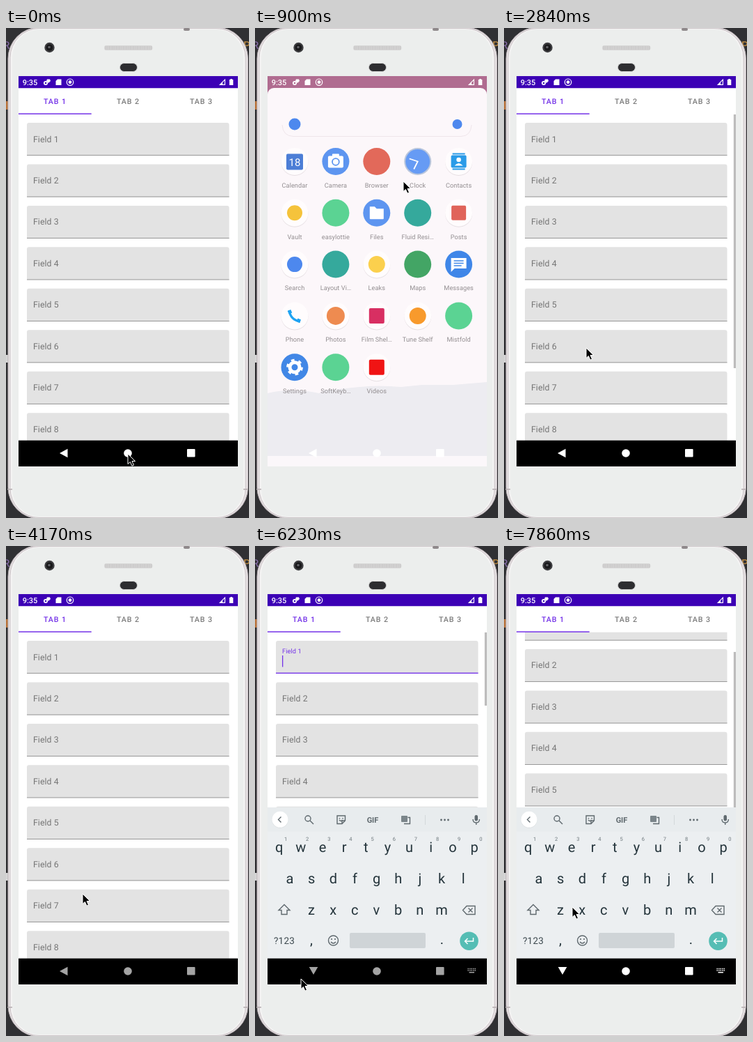
Write an HTML page that moves like this. It is 349 px wide and 703 px high and loops after 8000 ms.

```html
<!DOCTYPE html>
<html lang="en">
<head>
<meta charset="utf-8">
<title>Phone keyboard demo</title>
<style>
html, body { margin: 0; width: 100%; height: 100%; overflow: hidden; background: #303033; }
svg { display: block; width: 349px; height: 703px; font-family: Roboto, sans-serif; text-rendering: geometricPrecision; }
.mid { text-anchor: middle; }
.tab { font-size: 10.7px; font-weight: 500; letter-spacing: .95px; fill: #7b7b7b; }
.field { font-size: 12.25px; letter-spacing: .1px; fill: #757575; }
.app { font-size: 9.2px; letter-spacing: .05px; fill: #938e91; }
.key { font-size: 20px; fill: #24343b; }
.hint { font-size: 7.5px; fill: #6d777c; }
.line { fill: none; stroke: #5f696e; stroke-width: 1.4; }
</style>
</head>
<body>
<svg id="stage" viewBox="0 0 349 703"></svg>
<script>
const LOOP = 8000, STEPS = 54;
const PURPLE = '#7433e8', PITCH = 59.45;

const rect = (x, y, w, h, fill, rx = 0, more = '') =>
  `<rect x="${x}" y="${y}" width="${w}" height="${h}" rx="${rx}" fill="${fill}" ${more}/>`;
const circle = (x, y, r, fill, more = '') => `<circle cx="${x}" cy="${y}" r="${r}" fill="${fill}" ${more}/>`;
const path = (d, fill, more = '') => `<path d="${d}" fill="${fill}" ${more}/>`;
const stroke = (d, color, width) => path(d, 'none', `stroke="${color}" stroke-width="${width}"`);
const text = (x, y, s, cls, more = '') => `<text x="${x}" y="${y}" class="${cls}" ${more}>${s}</text>`;
const group = (id, body, more = '') => `<g id="${id}" ${more}>${body}</g>`;
const at = (x, y, body) => `<g transform="translate(${x} ${y})">${body}</g>`;

// Phone body and the desktop peeking out behind it
const phone = () =>
  rect(0, 0, 349, 703, '#303033') +
  text(-4, 30, 'R', '', 'font-size="15" fill="#8b6fae"') +
  text(341, 30, 'P', '', 'font-size="15" fill="#d59a45"') +
  rect(0, 105, 3, 12, '#b9743c') + rect(0, 469, 3, 11, '#d5d5d5') +
  rect(3, -1, 344.5, 705, '#e6e1e3', 45, 'stroke="#b9b1b5"') +
  rect(6, .5, 338, 702, '#f4f3f3', 42, 'stroke="#c3babe" stroke-width=".8"') +
  rect(9, 2, 332, 699, '#eceeed', 40) +
  rect(2, 661, 7, 1.5, '#b5adb0') + rect(341, 661, 7, 1.5, '#b5adb0') +
  rect(255, 0, 9, 4, '#8f898b', 2) +
  circle(62.5, 28, 7.2, '#3c3c3f') + circle(62.5, 28, 4.8, '#19191b') + circle(62, 27.5, 1.8, '#626266') +
  rect(141, 25, 69.5, 7, '#d6d5d5', 3) +
  path('M143 28.5H209', 'none', 'stroke="#c6c5c5" stroke-width="5" stroke-dasharray="1 1.5"') +
  rect(163.5, 50.5, 25, 12, '#2d2d30', 6, 'stroke="#d2d2d2"');

const field = i => {
  const y = 136 + i * PITCH;
  return `<g class="box">${path(`M30 ${y + 47}V${y + 3}q0 -3 3 -3H317.5q3 0 3 3V${y + 47}Z`, '#e3e3e3')}
    ${rect(30, y + 46.2, 290.5, .9, '#8e8e8e', 0, 'class="rule"')}
    ${text(39, y + 27.5, 'Field ' + (i + 1), 'field')}</g>`;
};

const form = () =>
  rect(18, 69, 315, 560, '#fff') +
  group('viewport',
    group('fields', [...Array(10).keys()].map(field).join('') + rect(39, 157, 1.3, 16.5, PURPLE, 0, 'id="caret"')) +
    rect(329.8, 124, 3.2, 364, '#bcbcbc', 0, 'id="thumb"'), 'clip-path="url(#list)"') +
  rect(18, 69, 315, 17.5, '#3c00b5') + rect(18, 86.5, 315, 37, '#fff') +
  [70.5, 175.5, 280.5].map((x, i) =>
    text(x, 109, 'TAB ' + (i + 1), 'tab mid', i ? '' : `style="fill:${PURPLE}"`)).join('') +
  rect(18, 122.4, 104.7, 1.5, PURPLE) +
  rect(18, 69, 315, 560, '#fff', 0, 'id="splash"');

// Launcher icons, drawn around 0,0
const disc = circle(0, 1, 19.5, '#e6dfe3') + circle(0, 0, 19.5, '#fffcfd');
const solid = fill => circle(0, 0, 19.5, fill);
const dot = (r, fill) => disc + circle(0, 0, r, fill);
const tile = (size, fill) => disc + rect(-size / 2, -size / 2, size, size, fill, 2);
const gear = circle(0, 0, 7, 'none', 'stroke="#fff" stroke-width="5"') +
  circle(0, 0, 10.2, 'none', 'stroke="#fff" stroke-width="3.4" stroke-dasharray="4.6 6.08"');
const GREEN = '#5bd393', TEAL = '#35a99c', BLUE = '#5d95f0', SKY = '#2a9be8';
const apps = [
  ['Calendar', disc + rect(-12, -11, 24, 23, '#4c7ed6', 2) +
    text(0, 6.5, '18', 'mid', 'font-size="15" fill="#fff"')],
  ['Camera', solid(BLUE) + rect(-11, -8, 22, 17, '#fff', 2) + rect(-5, -11, 10, 5, '#fff', 1) +
    circle(0, .5, 5.8, BLUE) + circle(0, .5, 4, '#fff')],
  ['Browser', solid('#e2695a')],
  ['Clock', solid('#b9c6dc') + circle(0, 0, 17.5, '#669bf4') + stroke('M-12 -4L0 0L-5.5 11', '#fff', 1.8)],
  ['Contacts', disc + rect(-11, -9, 22, 18, SKY, 2) + rect(-9, -12, 18, 2, SKY) +
    rect(-9, 10, 18, 2, SKY) + circle(0, -2.5, 3.3, '#fff') + path('M-6 6q6 -7 12 0z', '#fff')],
  ['Vault', dot(11, '#f5c33b')],
  ['easylottie', solid(GREEN)],
  ['Files', solid(BLUE) + path('M-10 -9h7l3 3h10v14q0 1 -1 1h-18q-1 0 -1 -1z', '#fff')],
  ['Fluid Resi…', solid(TEAL)],
  ['Posts', tile(21, '#e0645a')],
  ['Search', dot(11, '#4d88ee')],
  ['Layout Vi…', solid(TEAL)],
  ['Leaks', dot(12, '#fbd04d')],
  ['Maps', solid('#43a565')],
  ['Messages', solid('#3f86e8') + path('M-11 -9h22v15h-17l-5 5z', '#fff') +
    stroke('M-7 -5H7M-7 -1.5H7M-7 2H4', '#3f86e8', 1.5)],
  ['Phone', disc + stroke('M-8 -8q2 14 16 16', '#1fa3f2', 3.2) + stroke('M-8 -8l2 4.5M8 8l-4.5 -2', '#1fa3f2', 5)],
  ['Photos', dot(13, '#ee8b50')],
  ['Film Shel…', tile(22, '#d82f62')],
  ['Tune Shelf', dot(12, '#f89a2c')],
  ['Mistfold', solid(GREEN)],
  ['Settings', solid('#4187e6') + gear],
  ['SoftKeyb…', solid(GREEN)],
  ['Videos', tile(22, '#f01414')]
];
const appCell = ([name, art], i) => {
  const x = 57 + (i % 5) * 58.9, y = 164.5 + Math.floor(i / 5) * 73.8;
  const cell = at(x, y, art) + text(x, y + 37.3, name, 'app mid');
  return name.startsWith('Soft') ? group('launchSlot', cell) : cell;
};

const ridge = fill =>
  path('M18 524Q40 519 60 520T92 524L100 519Q125 518 150 515T210 515L240 512L285 512L333 508V629H18Z', fill);

const drawer = () =>
  rect(18, 59, 315, 650, '#fcf7fa', 9, 'id="panel"') +
  group('ridge', ridge('#edecf1')) +
  group('strip', rect(18, 587, 315, 38, '#fbf7fa')) +
  group('icons',
    stroke('M39 112q1 16 16 16.5H296q14 -.5 15 -16.5', '#eee4e9', .9) +
    circle(57, 111, 8.5, '#4d88ee') + circle(290.5, 111, 7, '#4d88ee') + apps.map(appCell).join(''));

const home = () =>
  rect(18, 69, 315, 560, '#b06c90') + ridge('#655b82') +
  [15, 14, 2, 1].map((a, i) => at(86 + i * 59, 510, apps[a][1])).join('') +
  rect(39, 548, 272, 34, '#fcf7fa', 17) + circle(57, 565, 8.5, '#4d88ee');

const keyboard = () => {
  const row = (letters, x, y) => [...letters].map((c, i) => text(x + i * 31.15, y, c, 'key mid')).join('');
  const line = d => path(d, 'none', 'class="line"');
  const grey = '#5f696e';
  return rect(18, 375, 315, 217, '#eceff1') + rect(18, 375, 315, 34.5, '#e8ecee') +
    circle(36, 393, 11.7, '#dce0e2') + circle(36, 392.3, 11.5, '#fff') + line('M37.5 388.5l-4 4l4 4') +
    circle(76, 391, 4, 'none', 'class="line"') + line('M79 394l5 5') +
    line('M118 387h11.5v7l-4.5 4.5h-7zM129.5 394h-4.5v4.5M121 393q2.5 3 4.5 0M121.5 390v1.5M126 390v1.5') +
    text(169, 396.5, 'GIF', 'mid', `font-size="11" font-weight="700" fill="${grey}"`) +
    rect(210, 387, 9, 9, '#7b858a', 1) + line('M214 398.5h8.5v-9h-3') +
    rect(244, 386, 1, 14, '#d3d8da') +
    [267.5, 272.5, 277.5].map(x => circle(x, 393, 1.4, grey)).join('') +
    rect(315.5, 386, 4.5, 8.5, grey, 2.2) + line('M313 392q0 5 4.7 5t4.7 -5M317.7 397v3') +
    row('qwertyuiop', 34.7, 439) + row('asdfghjkl', 50, 484) + row('zxcvbnm', 81, 529) +
    [...'1234567890'].map((c, i) => text(44 + i * 31.15, 423, c, 'hint mid')).join('') +
    line('M42 514.5l8 8h-4v6h-8v-6h-4z') +
    line('M304 516.5h12v12h-12l-5.5 -6zM306.5 519.5l6 6M312.5 519.5l-6 6') +
    text(42, 571, '?123', 'mid', 'font-size="13.5" letter-spacing=".2" fill="#3d494f"') +
    text(81, 572, ',', 'key mid') + text(268.5, 571, '.', 'key mid') +
    circle(112.5, 566, 7, 'none', 'class="line"') + circle(110, 564, 1.1, grey) +
    circle(115, 564, 1.1, grey) + line('M109 568q3.5 4 7 0') +
    rect(136, 555, 109, 22, '#cfd4d7', 2) +
    circle(307.5, 566.7, 13.3, '#55bdb4') + stroke('M313.5 562v5H302M305.5 563l-4 4l4 4', '#fff', 1.5);
};

const status = () =>
  text(23.7, 82, '9:35', '', 'font-size="11" font-weight="500"') +
  circle(57, 79, 2.2, 'none', 'stroke="currentColor" stroke-width="1.7"') +
  path('M59 73.5h4l1 2.500l-3 3l-3 -3z', 'currentColor') +
  path('M74 73.500h5.500v8.500h-8v-6z', 'currentColor') +
  circle(92, 77.700, 4.700, 'none', 'stroke="currentColor" stroke-width="1.2"') + circle(92, 77.700, 2.4, 'currentColor') +
  stroke('M314.4 74.2v7.2h-7.2z', 'currentColor', 1.1) + path('M311 77.600v3.800h-3.800z', 'currentColor') +
  path('M320.800 74h1.500v-1h2.500v1h1.500v8h-5.500z', 'currentColor');

const nav = () =>
  path('M77 610L88.500 603.700V616.300Z', 'currentColor', 'id="back"') +
  path('M77.700 604H90.300L84 615Z', 'currentColor', 'id="down"') +
  circle(175, 610, 5.800, 'currentColor') + rect(260, 604, 11.600, 11.600, 'currentColor', 1) +
  group('switcher',
    path('M305.500 606.500h11.500M305.500 609h11.500', 'none', 'stroke="currentColor" stroke-width="1.5" stroke-dasharray="1.5 1"') +
    rect(307.5, 611, 7.5, 1.5, 'currentColor'));

const stage = document.getElementById('stage');
stage.innerHTML =
  `<defs><clipPath id="screen">${rect(18, 69, 315, 560, '#000')}</clipPath>
   <clipPath id="list">${rect(18, 123.5, 315, 468.5, '#000')}</clipPath></defs>` + phone() +
  `<g clip-path="url(#screen)">` + group('home', home()) + group('drawer', drawer()) +
  group('launch', circle(0, 0, 29.5, '#68d69b')) + group('app', form()) +
  group('keyboardClip', group('keyboard', keyboard()), 'clip-path="url(#list)"') +
  rect(18, 591.7, 315, 37.5, '#000', 0, 'id="navBar"') +
  group('status', status(), 'fill="currentColor"') + group('nav', nav()) + '</g>' +
  group('cursor', path('M0 0V14.5L3.4 11.5L5.9 17.2L8.5 16.1L6 10.5H10.6Z', '#000', 'stroke="#fff" stroke-width="1"'));

const $ = id => document.getElementById(id);
const show = (id, on) => { $(id).style.display = on ? '' : 'none'; };
const move = (id, x, y) => $(id).setAttribute('transform', `translate(${x} ${y})`);

// Linear value of a [step, value] table
const track = (keys, q) => {
  let i = keys.findIndex(k => k[0] > q);
  if (i < 0) return keys[keys.length - 1][1];
  if (!i) return keys[0][1];
  const [a, u] = keys[i - 1], [b, v] = keys[i];
  return u + (v - u) * (q - a) / (b - a);
};
const pointer = [
  [0, 175, 611], [2, 177, 600], [3, 190, 540], [4, 190, 540], [5, 209, 320], [6, 213, 220], [8, 213, 220],
  [11, 117, 470], [14, 117, 470], [19, 118, 459], [24, 118, 459], [28, 110, 499], [32, 95, 160],
  [39, 95, 160], [42, 66, 621], [44, 82, 612], [47, 82, 612], [50, 98, 518]
];
const pointerX = pointer.map(p => [p[0], p[1]]), pointerY = pointer.map(p => [p[0], p[2]]);
const sheet = [[35, 217], [36, 120], [37, 30], [38, 0], [43, 0], [44, 70], [45, 170], [46, 217], [50, 217], [51, 130], [52, 25], [53, 0]];
const lift = [[4, 560], [5, 270], [6, 27], [7, 5], [8, 0]];
const scroll = [[51, 0], [52, 15], [53, 47.5]];
const appSize = [[0, 1], [1, .78], [2, .38], [14, .15], [15, .58], [16, 1]];

const fieldBoxes = [...document.querySelectorAll('.box')];
function focusField(index, float, active) {
  const box = fieldBoxes[index], label = box.querySelector('.field'), rule = box.querySelector('.rule');
  const y = 136 + index * PITCH;
  label.setAttribute('y', y + 27.5 - 10 * float);
  label.style.fontSize = 12.25 - 3.05 * float + 'px';
  label.style.fill = float ? PURPLE : '';
  rule.setAttribute('fill', active ? PURPLE : '#8e8e8e');
  rule.setAttribute('y', y + (active ? 45.7 : 46.2));
  rule.setAttribute('height', active ? 1.4 : .9);
}

function render(q) {
  const inApp = q < 3 || q > 14, keysY = track(sheet, q), keysUp = keysY < 217;
  const shift = track(scroll, q), rise = track(lift, q);

  show('app', inApp);
  const size = track(appSize, q), px = q < 3 ? 175 : 150, py = q < 3 ? 500 : 410;
  $('app').setAttribute('transform', `translate(${px * (1 - size)} ${py * (1 - size)}) scale(${size})`);
  $('app').style.opacity = q === 2 ? .5 : 1;
  show('splash', q === 15);

  show('drawer', q > 4 && q < 16);
  for (const id of ['panel', 'strip', 'icons']) move(id, 0, rise);
  show('ridge', q > 5);
  show('launchSlot', q < 13);
  show('launch', q === 13 || q === 14);
  $('launch').setAttribute('transform', q === 13 ? 'translate(117 459) scale(.72)' : 'translate(131.5 457)');

  move('fields', 0, -shift);
  const float = q < 51 ? track([[35, 0], [36, .6], [37, 1]], q) : 0;
  focusField(0, float, q > 34 && q < 51);
  focusField(6, q > 51 ? 1 : 0, q > 50);
  show('caret', q > 35 && q < 51 && q !== 40 && q !== 41 && !(q > 45 && q < 49));
  $('thumb').style.opacity = q > 30 ? track([[32, 0], [34, 1]], q) : track([[16, 0], [17, 1], [20, 1], [22, 0]], q);
  $('thumb').setAttribute('y', 124 + shift * .59);
  $('thumb').setAttribute('height', q > 35 && q < 44 ? 105 : 364);

  show('keyboardClip', keysUp);
  move('keyboard', 0, keysY);

  show('navBar', q < 2 || q > 15);
  show('back', !keysUp);
  show('down', keysUp);
  show('switcher', keysUp);
  const light = Math.round(track([[22, 255], [26, 164], [42, 164], [43, 255]], q));
  $('nav').style.color = q > 6 && q < 16 ? '#6b686a' : `rgb(${light},${light},${light})`;
  $('status').style.color = q > 6 && q < 15 ? '#777174' : '#fff';

  move('cursor', track(pointerX, q), track(pointerY, q));
}

let last = -1;
function tick() {
  const q = Math.floor(performance.now() % LOOP * STEPS / LOOP);
  if (q !== last) render(last = q);
  requestAnimationFrame(tick);
}
tick();
</script>
</body>
</html>
```
